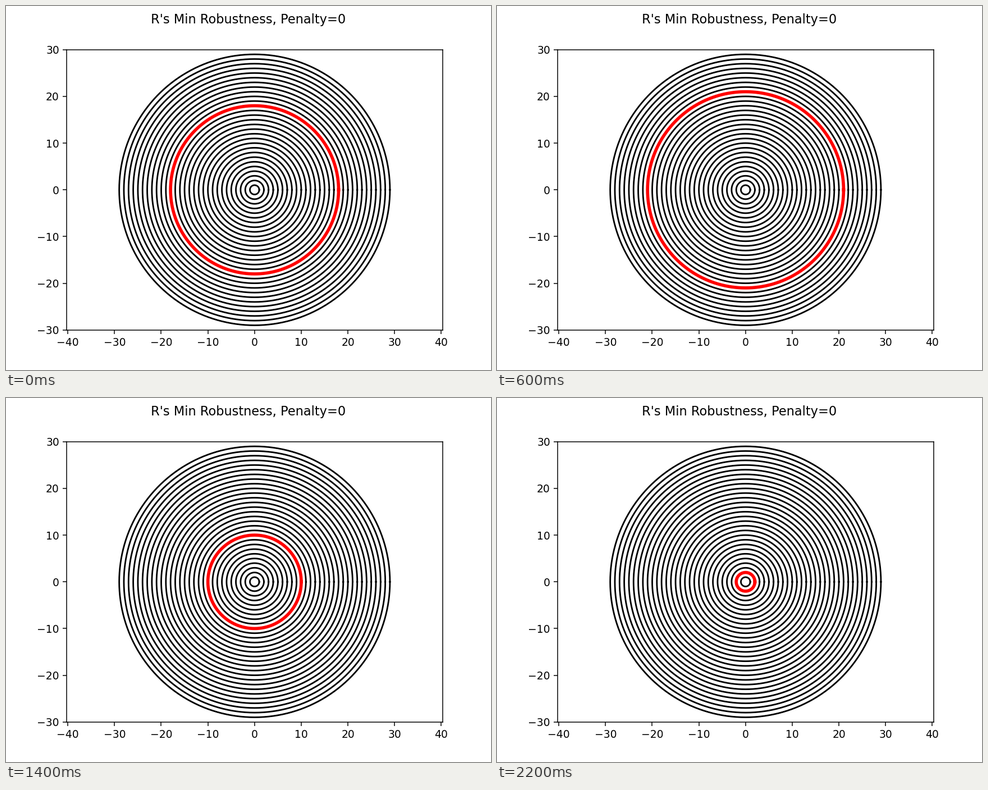
A matplotlib script for the animation above (2400 ms loop, 864 by 648 pixels).

```python
import numpy as np
import matplotlib.pyplot as plt
from matplotlib.animation import FuncAnimation

STEP_MS = 200
MAX_RADIUS = 29
# Highlighted radius at each step of the loop
RADII = [18, 13, 15, 21, 19, 14, 14, 10, 9, 7, 5, 2]

plt.rcParams["font.family"] = "DejaVu Sans"
theta = np.linspace(0, 2 * np.pi, 361)


def ring(radius):
    return radius * np.cos(theta), radius * np.sin(theta)


fig, ax = plt.subplots(figsize=(6.4, 4.8), dpi=135)
fig.suptitle("R's Min Robustness, Penalty=0")

for r in range(1, MAX_RADIUS + 1):
    ax.plot(*ring(r), color="black", lw=1.5)
highlight, = ax.plot(*ring(RADII[0]), color="red", lw=3, zorder=3)

# Equal scale on both axes inside the default axes box
box = ax.get_position()
half_x = 30 * (box.width * 6.4) / (box.height * 4.8)
ax.set_xlim(-half_x, half_x)
ax.set_ylim(-30, 30)
ax.set_xticks(range(-40, 41, 10))
ax.set_yticks(range(-30, 31, 10))


def update(step):
    highlight.set_data(*ring(RADII[step]))
    return highlight,


anim = FuncAnimation(fig, update, frames=len(RADII), interval=STEP_MS,
                     repeat=True, repeat_delay=0)
plt.show()
```
